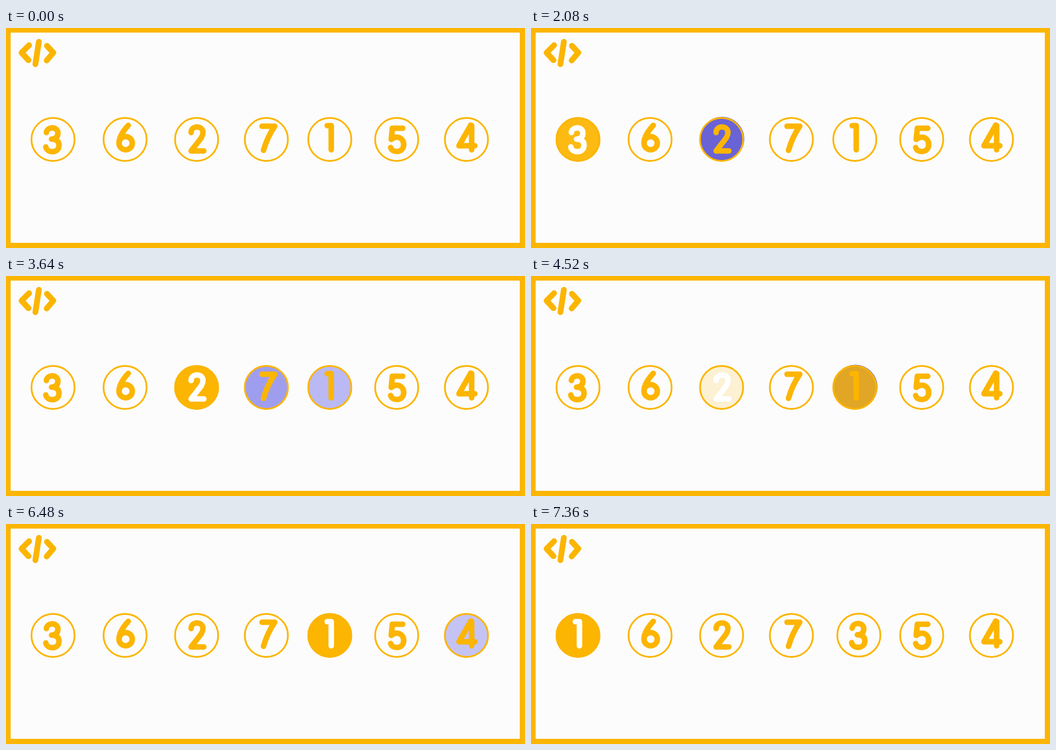
These frames come from a looping animation (900x383 px, 8480 ms). An HTML page:

```html
<!DOCTYPE html>
<html lang="en">
<head>
<meta charset="utf-8">
<title>Selection sort</title>
<style>
html, body { margin: 0; width: 100%; height: 100%; overflow: hidden; background: #fcb500; }
svg { display: block; width: 100%; height: 100%; }
path { fill: none; stroke: #fcb500; stroke-width: 9.6; stroke-linecap: round; stroke-linejoin: round; }
.ring { fill: none; stroke: #fcb500; stroke-width: 3; }
</style>
</head>
<body>
<svg id="stage" viewBox="0 0 900 383">
  <rect x="8" y="8" width="883" height="366" fill="#fcfcfc"/>
  <path d="M40 30L27 43L39 56M57 24L51 63M71 31L82 43L70.5 56.5" style="stroke-width:10"/>
</svg>
<script>
const LOOP = 8480, TICK = 40, STEP = 685, FIRST_END = 592, SWAP = 11, SWAP_END = 7360;
const NS = 'http://www.w3.org/2000/svg';
const stage = document.getElementById('stage');

// mark: steps in which the purple highlight comes and goes; pick: the same for the orange fill
const nodes = [
  { n: 3, x: 81.5, pick: [1, 4], move: [487, -0.6],
    d: 'M70 182C71 171 90 171 90 183C90 190 86 193.5 79 193.5C87 193.5 92 197 92 204C92 218.5 71 218.5 69 207' },
  { n: 6, x: 206.5, mark: [2, 3],
    d: 'M212 169.5Q196 187 196 200.5A11.5 11.5 0 1 0 219 200.5A11.5 11.5 0 1 0 196 200.5' },
  { n: 2, x: 330.5, mark: [3, 4], pick: [4, 7],
    d: 'M321 182C321 169 341.5 169 341.5 182C341.5 191 334 196 321 214H343' },
  { n: 7, x: 451.5, mark: [5, 6], d: 'M444 171H466Q453 190 446.5 213' },
  { n: 1, x: 561.5, mark: [6, 7], pick: [7, 99], move: [-480, 0],
    d: 'M557 170H564V212' },
  { n: 5, x: 677.5, mark: [8, 9],
    d: 'M688 174.5H670L668 194Q673 190 678 190C693.5 191 693.5 215 678 215Q669 215 667 208' },
  { n: 4, x: 798.5, mark: [9, 10], d: 'M806 169L785.5 205H813M807.5 170V212' }
];

function add(parent, tag, attrs) {
  const el = document.createElementNS(NS, tag);
  for (const key in attrs) el.setAttribute(key, attrs[key]);
  return parent.appendChild(el);
}

for (const node of nodes) {
  const g = node.g = add(stage, 'g', { role: 'img', 'aria-label': node.n });
  const disc = { cx: node.x, cy: 194, r: 38.5 };
  node.purple = add(g, 'circle', { ...disc, fill: '#5e5ce6' });
  node.orange = add(g, 'circle', { ...disc, fill: '#fcb500' });
  add(g, 'circle', { ...disc, r: 37.4, class: 'ring' });
  node.digit = add(g, 'path', { d: node.d });
}

// Eased progress of a numbered step, 0 to 1
function progress(step, t) {
  const end = step === SWAP ? SWAP_END : FIRST_END + STEP * (step - 1);
  const start = step === 1 ? TICK : FIRST_END + STEP * (step - 2);
  const u = Math.min(1, Math.max(0, (t - start) / (end - start)));
  return (1 - Math.cos(Math.PI * u)) / 2;
}

function draw(t) {
  const swap = progress(SWAP, t);
  for (const { g, purple, orange, digit, mark, pick, move } of nodes) {
    const at = steps => steps ? steps.map(s => progress(s, t)) : [0, 0];
    const [markIn, markOut] = at(mark), [pickIn, pickOut] = at(pick);
    // A picked circle keeps its purple below until the orange covers it
    const covered = mark && pick;
    purple.setAttribute('opacity', markIn - (covered ? Math.floor(markOut) : markOut));
    purple.setAttribute('transform', covered && markOut > 0 ? 'translate(.9 -.9)' : '');
    orange.setAttribute('opacity', pickIn - pickOut);
    digit.style.stroke = pickIn === 1 && pickOut < 1 ? '#fff' : '';
    if (move) g.setAttribute('transform', `translate(${move[0] * swap} ${move[1] * swap})`);
  }
}

const begin = performance.now();
function frame() {
  const t = (performance.now() - begin) % LOOP;
  draw(Math.floor(t / TICK) * TICK);
  requestAnimationFrame(frame);
}
frame();
</script>
</body>
</html>
```
